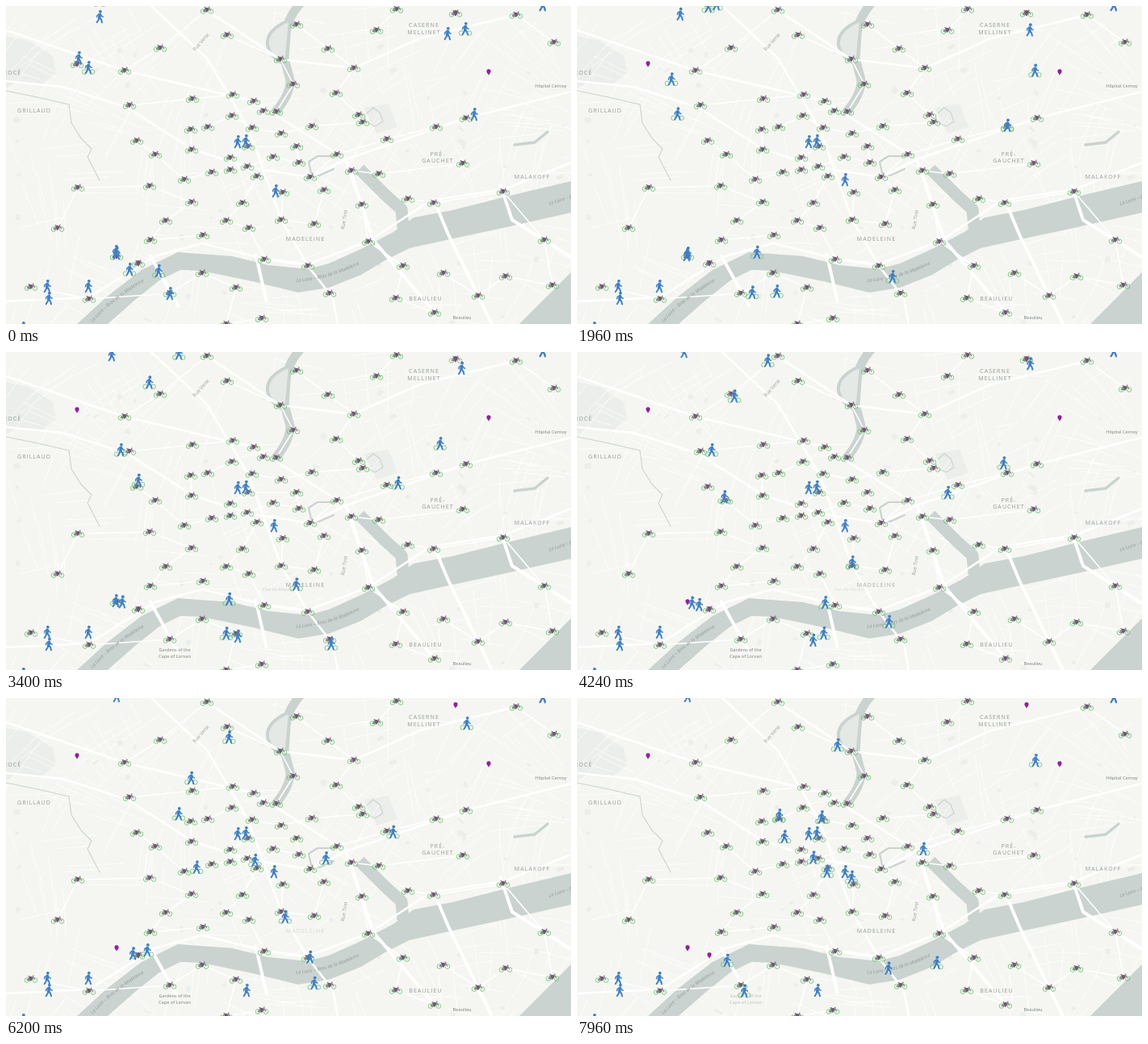
Animation, 700 px wide and 394 px high, one loop 8 s. Source, as an HTML page:

```html
<!DOCTYPE html>
<html lang="en">
<head>
<meta charset="utf-8">
<title>City bikes</title>
<style>
html, body { margin: 0; width: 100%; height: 100%; overflow: hidden; background: #f5f6f1; }
svg { display: block; width: 100vw; height: 100vh; }
text { font-family: "Open Sans", "Noto Sans", sans-serif; fill: #949a9a; text-anchor: middle; }
.area { font-family: Roboto, Arial, sans-serif; font-size: 7px; letter-spacing: 1.1px; fill: #a0a5a5; }
.street { font-size: 6px; fill: #858b8b; }
.place { font-size: 5.5px; font-weight: 600; fill: #858b8b; }
.river { font-size: 6px; font-style: italic; fill: #8d9898; }
.land { fill: #ebeeea; }
.water { fill: #cad3d0; }
.canal { fill: none; stroke: #cad3d0; stroke-linecap: round; stroke-linejoin: round; }
.road { fill: none; stroke: #fff; stroke-linejoin: round; }
.stops { fill: none; marker: url(#stop); }
.waiting { fill: none; marker: url(#stander); }
</style>
</head>
<body>
<svg viewBox="0 0 700 394" preserveAspectRatio="none">
  <defs>
    <path id="pin" d="M0 4C-.6 2-2.6 1-2.6-1.2A2.6 2.6 0 0 1 2.6-1.2C2.6 1 .6 2 0 4Z" fill="#931f9f"/>
    <g id="wheels" fill="none" stroke="#74c67c" stroke-width=".9">
      <circle cx="-5" cy="1.6" r="2.8"/><circle cx="5" cy="1.6" r="2.8"/>
    </g>
    <g id="bike">
      <use href="#wheels"/>
      <use href="#pin" transform="scale(.8)"/>
      <path d="M-5 1.6L-2.4-1.8H2.6L0 2ZM-3.6-3.2H-1.6L0 2M2-3.8H3.6M2.2-3.6L5 1.6" fill="#666a66" fill-opacity=".45" stroke="#666a66" stroke-width=".9"/>
    </g>
    <g id="man" fill="none" stroke="#3f80c8" stroke-linecap="round" stroke-linejoin="round">
      <circle cx=".8" cy="-6.2" r="1.9" fill="#3f80c8" stroke="none"/>
      <path d="M.2-2.4L-.3 1.6" stroke-width="3.6"/>
      <path d="M-.8-3L-3-1.4L-3.5.8M1.3-2.5L2.6-.4L4.2.3" stroke-width="1.5"/>
      <path d="M-.8 2L-1.8 4.8L-3.4 7.2M.4 1.8L2.1 4.2L3 7.4" stroke-width="2"/>
    </g>
    <marker id="stop" markerUnits="userSpaceOnUse" overflow="visible"><use href="#bike"/></marker>
    <marker id="stander" markerUnits="userSpaceOnUse" overflow="visible"><use href="#man"/></marker>
    <!-- Streets; every corner has a bike station -->
    <path id="streets" d="M147 80L191 52L249 5
      M153 123L231 115L281 110L307 118L319 130L335 131L356 97L340 66L274 36
      M360 23L399 53L431 77L409 108L437 135L442 144L379 149L341 158L305 151L280 136L250 150L229 153L230 178
      M459 30L484 4M632 11L679 45
      M570 139L533 150L472 165L410 184L377 212L394 228L382 270L341 265L343 231
      M566 195L462 208L428 204L441 246L449 292L492 322L483 362L531 380
      M162 167L185 184L221 215L255 206L278 203L299 199L331 187L363 194L360 174L300 174L278 188L311 211L293 244L273 266L301 275L320 314L374 322L401 356
      M64 275L89 225L178 223L230 243L198 266L179 290L244 284
      M31 348L103 363L203 356L243 331L285 349L273 394L317 387
      M498 239L530 244L616 230L667 290L677 346L619 335L585 359L542 331"/>
    <path id="west" d="M106 394Q130 365 173 340"/>
    <path id="mid" d="M357 342Q398 340 440 319"/>
  </defs>

  <path class="land" d="M0 37L28 43L58 62L62 83L42 99L14 94L0 102ZM443 126L474 121L485 150L459 158Z"/>
  <path id="lanes" class="road" stroke-width=".9" opacity=".8"/>
  <g id="blocks" class="land"></g>

  <g class="canal">
    <path stroke-width="1.1" d="M0 105L39 113L78 122L81 145L93 164L106 177L101 187L116 216"/>
    <path stroke-width="11" d="M366 -5Q348 15 347 35L345 65L352 92Q352 110 334 131"/>
    <path stroke-width="4" fill="#e4e9e6" d="M350 18Q322 30 324 48Q327 64 345 72"/>
    <path stroke-width="15" stroke-linecap="butt" d="M438 202L470 234L490 252L492 275"/>
    <path stroke-width="2.2" d="M378 207L375 193L386 186L405 186M378 207L388 210L406 202"/>
    <path stroke-width="1.1" d="M447 133L455 126L463 132L467 143L457 149L449 145"/>
    <path stroke-width="3.5" d="M630 172L655 169L671 156"/>
  </g>
  <path class="water" d="M88 394L125 360L168 327L213 305L280 310L325 321L374 326L400 319L440 301L480 280L505 262L553 253L620 236L700 217V256L620 274L550 289L500 300L470 315L440 333L400 349L362 355L305 341L242 328L216 327L190 340L160 364L126 394Z"/>
  <path class="water" d="M700 330L636 394H700Z"/>

  <use href="#streets" class="road" stroke-width="1.6"/>
  <g class="road" stroke-width="2.6">
    <path d="M0 93L70 100L151 126L230 177L300 200L377 212L421 190L570 139L700 106M0 30L147 80L307 118L421 190"/>
    <path d="M0 366L103 361L184 310L243 294L320 313L374 320L450 291L526 241L617 227L700 194"/>
    <path d="M180 0L249 65L300 151L341 265L374 322L405 362L411 394M241 0L340 66L431 77L513 40L632 11"/>
  </g>
  <g class="road" stroke-width="4">
    <path d="M178 308L214 373M309 306L323 367M421 190L455 290L531 380M530 240L548 283L602 394M612 220L627 265L700 311"/>
  </g>

  <g class="area">
    <text x="518" y="26">CASERNE</text><text x="518" y="34.5">MELLINET</text>
    <text x="35" y="132">GRILLAUD</text><text x="8" y="85">ROCÉ</text>
    <text x="535" y="186">PRÉ-</text><text x="535" y="194">GAUCHET</text>
    <text x="652" y="214">MALAKOFF</text><text x="520" y="365">BEAULIEU</text>
    <text id="madeleine" x="371" y="291">MADELEINE</text>
  </g>
  <g class="street">
    <text transform="translate(243 46) rotate(-48)">Rue Verte</text>
    <text transform="translate(421 265) rotate(-81)">Rue Tirel</text>
  </g>
  <g class="place">
    <text x="675" y="101">Hôpital Cernoy</text><text x="565" y="388">Beaulieu</text>
    <g id="gardens"><text x="209" y="371">Gardens of the</text><text x="209" y="378.5">Cape of Lorvan</text></g>
    <text id="cite" x="337" y="296">Cité du Moulin</text>
  </g>
  <g class="river">
    <text id="loire"><textPath href="#west" startOffset="50%">La Loire – Bras de la Madeleine</textPath></text>
    <text><textPath href="#mid" startOffset="50%">La Loire – Bras de la Madeleine</textPath></text>
    <text transform="translate(673 247) rotate(-18)" style="text-anchor:start">La Loire – Bras</text>
  </g>

  <use href="#streets" class="stops"/>
  <g id="stations"></g>
  <path class="waiting" d="M287 168L297 167M102 347L51 347L53 362L21 399M665 -2L665 -2"/>
  <g id="people"></g>
</svg>
<script>
const LOOP = 8, FADE = 0.3;
const $ = id => document.getElementById(id);

function make(tag, attrs = {}, parent) {
  const el = document.createElementNS('http://www.w3.org/2000/svg', tag);
  for (const k in attrs) el.setAttribute(k, attrs[k]);
  if (parent) parent.appendChild(el);
  return el;
}
const show = (el, on) => el.setAttribute('visibility', on ? 'visible' : 'hidden');
const fade = (id, value) => $(id).setAttribute('opacity', value);
const clamp = v => Math.max(0, Math.min(1, v));

// Side streets and buildings
let seed = 17;
const rnd = () => (seed = seed * 16807 % 2147483647) / 2147483647;
let lanes = '';
for (let i = 0; i < 330; i++) {
  const x = rnd() * 700, y = rnd() * 394, r = 28 + rnd() * 56;
  const a = Math.sin(x / 90) * 0.6 + Math.cos(y / 70) * 0.5 + (i % 2) * Math.PI / 2;
  lanes += `M${x} ${y}l${r * Math.cos(a)} ${r * Math.sin(a)}`;
}
$('lanes').setAttribute('d', lanes);
for (let i = 0; i < 40; i++) {
  make('rect', {
    width: 3 + rnd() * 8, height: 2 + rnd() * 5,
    transform: `translate(${rnd() * 700} ${rnd() * 394}) rotate(${rnd() * 90 - 45})`
  }, $('blocks'));
}

// Stations that keep only their pin once the last bike has left
const stations = [];
function station(x, y, leave) {
  make('use', { href: '#pin', x, y }, $('stations'));
  stations.push({ leave, el: make('use', { href: '#bike', x, y }, $('stations')) });
}
station(598, 82, 0);
station(88, 72, 0.9);
station(557, 9, 5.25);
station(137, 310, 3.45);
station(164, 319, 7.1);

// A leg covers its path at constant speed
function leg(from, to, d, bike) {
  const path = make('path', { d });
  return { from, to, path, bike, length: path.getTotalLength() };
}
const walk = (from, to, d) => leg(from, to, d, false);
const ride = (from, to, d) => leg(from, to, d, true);

const people = [];
function person(...legs) {
  const el = make('g', {}, $('people'));
  const bike = make('use', { href: '#wheels', y: 4 }, el);
  make('use', { href: '#man' }, el);
  people.push({ el, bike, legs });
}

person(walk(0, 5, 'M116 13L131 9V0L137 -3'));
person(walk(0, 1.9, 'M334 229L331 222L332 215'));
person(ride(0, 8, 'M102 76L115 128L157 151L195 193L228 211L294 197'));
person(walk(0, 0.76, 'M90 64L88 70'), ride(0.76, 8, 'M88 70L118 91L136 121H196L217 147L258 172'));
person(ride(0, 8, 'M109 -12L162 -3L170 30L209 68L229 98L251 146'));
person(ride(0, 8, 'M116 -8L173 -3L222 2L262 25L281 56L324 58'));
person(ride(0, 5.1, 'M424 405L389 331L322 232'), ride(5.1, 8, 'M322 232L306 195L303 146'));
person(ride(0, 8, 'M569 28L584 49L568 79L537 114L524 150L486 163L428 187'));
person(walk(0, 0.76, 'M580 134L573 136'), ride(0.76, 8, 'M573 136L490 160L435 185L399 197L339 222'));
person(walk(0, 5.2, 'M547 34L562 29L565 21L558 8'), ride(5.2, 8, 'M558 8L572 33L568 78'));
person(walk(0, 0.5, 'M136 304V308'), walk(3.4, 7.1, 'M136 308L164 319'), ride(7.1, 8, 'M164 319L187 325'));
person(walk(2.6, 5.7, 'M137 306L164 319'), ride(5.7, 8, 'M164 319L173 309L208 364'));
person(ride(0, 6.1, 'M153 326L182 316L226 304L279 306L376 320'), walk(6.1, 8, 'M376 320L386 335'));
person(ride(0, 2.9, 'M189 328L205 358L284 349'), walk(2.9, 5.1, 'M284 349L298 362'));
person(ride(1.6, 8, 'M203 356L275 348H340L383 353L447 327'));
person(ride(1.96, 8, 'M418 414L402 358L342 265L309 213'));

function move({ el, bike, legs }, t) {
  const now = legs.filter(l => l.from <= t).pop() || legs[0];
  const k = clamp((t - now.from) / (now.to - now.from));
  const { x, y } = now.path.getPointAtLength(k * now.length);
  el.setAttribute('transform', `translate(${x.toFixed(2)} ${y.toFixed(2)})`);
  show(bike, now.bike && t >= now.from);
}

// 1 inside the span, with soft edges
const span = (t, from, to) => clamp(Math.min((t - from) / FADE, 1 - (t - to) / FADE));

function draw(t) {
  for (const p of people) move(p, t);
  for (const s of stations) show(s.el, t < s.leave);
  fade('madeleine', 1 - Math.max(span(t, 3.4, 4), span(t, 5.1, 6.1)));
  fade('cite', span(t, 3.3, 4));
  fade('gardens', span(t, 2.3, 7.8));
  fade('loire', 1 - span(t, 0.1, 0.65));
}

const start = performance.now();
function tick() {
  draw((performance.now() - start) / 1000 % LOOP);
  requestAnimationFrame(tick);
}
tick();
</script>
</body>
</html>
```
